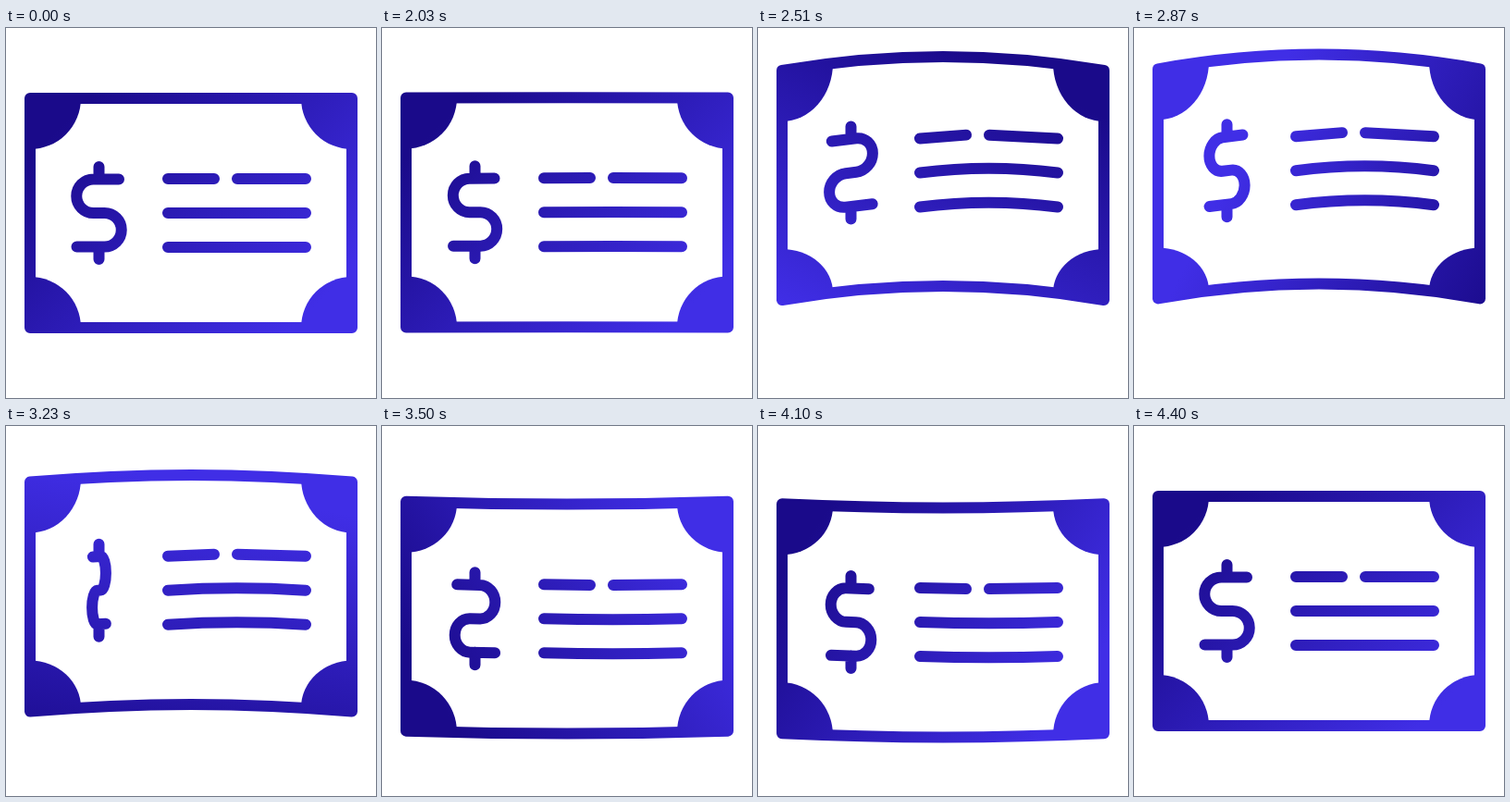
An HTML page with a canvas for the animation above (4430 ms loop, 400 by 400 pixels).

```html
<!DOCTYPE html>
<html lang="en">
<head>
<meta charset="utf-8">
<title>Waving banknote</title>
<style>
  html, body { margin: 0; width: 100%; height: 100%; overflow: hidden; background: #fff; }
  canvas { display: block; }
</style>
</head>
<body>
<canvas id="stage" width="400" height="400"></canvas>
<script>
const ctx = document.getElementById('stage').getContext('2d');
const LOOP = 4430, REST = 2000, STEP = 30;

// [ms, value]; the outer two keys only shape the tangents at the ends
const LIFT = [[-270, -20], [0, 0], [270, -20.7], [540, -30.7], [800, -32.2], [1080, -26],
  [1500, 5.7], [1790, 15.5], [2100, 8.3], [2400, 0], [2700, 8]];
const SPIN = [[-100, -40], [0, 0], [270, 110], [870, 322], [1500, 566], [2100, 694],
  [2400, 720], [2500, 720]];
const TURN = [[-270, 15], [0, 0], [270, 15], [870, 161], [1500, 283], [2100, 350],
  [2400, 360], [2500, 360]];

// Smooth curve through the keys (cubic Hermite)
function curve(keys, t) {
  let i = 1;
  while (i < keys.length - 3 && t > keys[i + 1][0]) i++;
  const [before, a, b, after] = keys.slice(i - 1, i + 3);
  const span = b[0] - a[0];
  const u = Math.min(1, (t - a[0]) / span);
  const slopeA = (b[1] - before[1]) / (b[0] - before[0]) * span;
  const slopeB = (after[1] - a[1]) / (after[0] - a[0]) * span;
  const v = 1 - u;
  return v * v * (1 + 2 * u) * a[1] + u * u * (3 - 2 * u) * b[1]
    + u * v * (v * slopeA - u * slopeB);
}

const radians = degrees => degrees * Math.PI / 180;

// Dark end circles the note clockwise, starting at the top left
function gradient(turn) {
  const angle = turn + Math.PI * 1.25;
  const dx = Math.cos(angle), dy = Math.sin(angle);
  const shift = 65 * Math.sin(turn / 2) ** 6;
  const dark = shift + 165, light = shift - 165;
  const paint = ctx.createLinearGradient(200 + dx * dark, 200 + dy * dark,
    200 + dx * light, 200 + dy * light);
  paint.addColorStop(0, '#1a0a8a');
  paint.addColorStop(1, '#402ee6');
  return paint;
}

function drawNote(lift) {
  const top = 76 + lift, bottom = 324 + lift;
  ctx.beginPath();
  ctx.moveTo(26, top);
  ctx.quadraticCurveTo(200, top + lift, 374, top);
  ctx.lineTo(374, bottom);
  ctx.quadraticCurveTo(200, bottom + lift, 26, bottom);
  ctx.closePath();
  ctx.stroke();
  ctx.save();
  ctx.clip();
  // The corners stretch with the bend of the edge they touch
  const bend = lift * 0.266;
  for (const x of [26, 374]) {
    for (const [y, ry] of [[top, 55 - bend], [bottom, 55 + bend]]) {
      ctx.beginPath();
      ctx.ellipse(x, y + bend, 55, ry, 0, 0, Math.PI * 2);
      ctx.fill();
    }
  }
  ctx.restore();
}

function drawLines(shift, sag) {
  const y = 163 + shift;
  ctx.beginPath();
  ctx.moveTo(175, y);
  ctx.lineTo(225, y + sag * 0.8);
  ctx.moveTo(250, y + sag * 0.8);
  ctx.lineTo(324, y);
  for (const row of [200, 237]) {
    ctx.moveTo(175, row + shift);
    ctx.quadraticCurveTo(249.5, row + shift + sag * 2, 324, row + shift);
  }
  ctx.stroke();
}

// The path is squeezed sideways, the stroke keeps its width
function drawDollar(shift, squeeze, shear) {
  const quarter = Math.PI / 2, r = 18.25;
  ctx.save();
  ctx.transform(squeeze, shear * squeeze, 0, 1, 100.5, 200 + shift);
  ctx.beginPath();
  ctx.moveTo(21.5, -2 * r);
  ctx.arc(-6, -r, r, -quarter, quarter, true);
  ctx.arc(6, r, r, -quarter, quarter);
  ctx.lineTo(-24, 2 * r);
  for (const side of [-1, 1]) {
    ctx.moveTo(0, side * 50);
    ctx.lineTo(0, side * 2 * r);
  }
  ctx.restore();
  ctx.stroke();
}

function draw(now) {
  const time = Math.max(0, now % LOOP - REST);
  const t = Math.floor(time / STEP) * STEP;
  const lift = curve(LIFT, t);
  const spin = radians(curve(SPIN, t));
  const shift = lift * 1.45;

  ctx.fillStyle = '#fff';
  ctx.fillRect(0, 0, 400, 400);
  ctx.fillStyle = ctx.strokeStyle = gradient(radians(curve(TURN, t)));
  ctx.lineWidth = 12;
  ctx.lineCap = ctx.lineJoin = 'round';

  drawNote(lift);
  drawLines(shift, lift * 0.16);
  drawDollar(shift, Math.cos(spin), lift * 0.004);
}

const start = performance.now();
function frame() {
  draw(performance.now() - start);
  requestAnimationFrame(frame);
}
frame();
</script>
</body>
</html>
```
